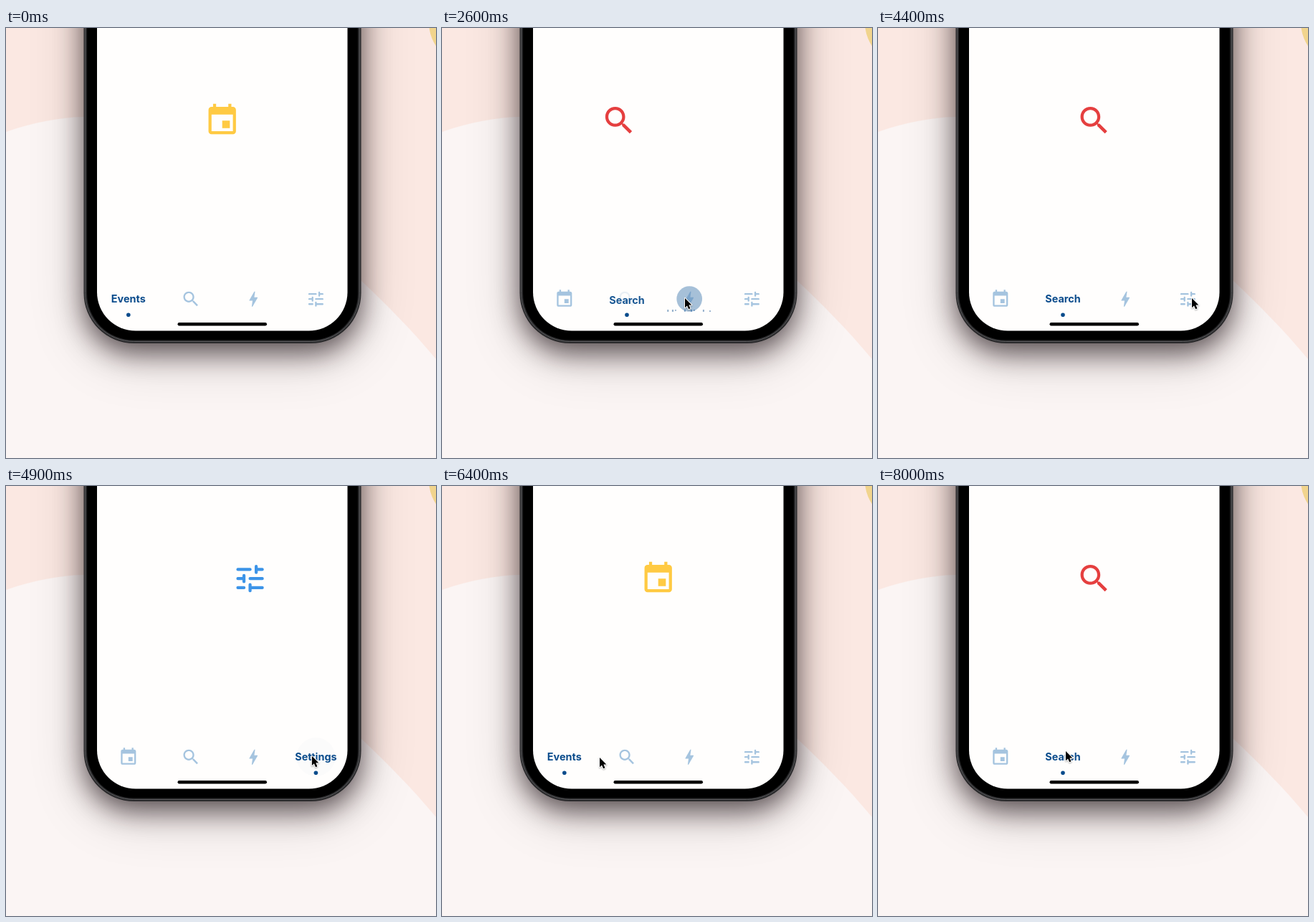
Animation, 600 px wide and 600 px high, one loop 8.1 s. Source, as an HTML page with a canvas:

```html
<!DOCTYPE html>
<html lang="en">
<head>
<meta charset="utf-8">
<title>Tab bar</title>
<style>
html, body { margin: 0; width: 100%; height: 100%; overflow: hidden; background: #fbe8e2; }
canvas { display: block; width: 600px; height: 600px; }
</style>
</head>
<body>
<canvas id="stage"></canvas>
<script>
const LOOP = 8100, STEP = 100;
const SCREEN = { x: 127, w: 349.5, bottom: 422.5 };
const NAVY = '#0b4c8c', IDLE = '#a5c4df';

const canvas = document.getElementById('stage');
const ctx = canvas.getContext('2d');
const dpr = Math.max(1, window.devicePixelRatio || 1);
canvas.width = canvas.height = 600 * dpr;

const EVENT = new Path2D('M17 12h-5v5h5v-5zM16 1v2H8V1H6v2H5c-1.11 0-1.99.9-1.99 2L3 19c0 1.1.89 2 2 2h14c1.1 0 2-.9 2-2V5c0-1.1-.9-2-2-2h-1V1h-2zm3 18H5V8h14v11z');
const SEARCH = new Path2D('M15.5 14h-.79l-.28-.27C15.41 12.59 16 11.11 16 9.5 16 5.91 13.09 3 9.5 3S3 5.91 3 9.5 5.91 16 9.5 16c1.61 0 3.09-.59 4.23-1.57l.27.28v.79l5 4.99L20.49 19l-4.99-5zm-6 0C7.01 14 5 11.99 5 9.5S7.01 5 9.5 5 14 7.01 14 9.5 11.99 14 9.5 14z');
const BOLT = new Path2D('M11 21h-1l1-7H7.5c-.88 0-.33-.75-.31-.78C8.48 10.94 10.42 7.54 13.01 3h1l-1 7h3.51c.4 0 .62.19.4.66C12.97 17.55 11 21 11 21z');
const TUNE = new Path2D('M4 6h8M16 6h4M16 4v4M4 12h4M8 10v4M12 12h8M4 18h4M12 18h8M12 16v4');
const ARROW = new Path2D('M0 0V13.2L3 10.4 5.2 15.3 7.5 14.3 5.4 9.5H9.4Z');
const BLOB = new Path2D('M0 145C40 131 75 125 108 124C280 118 400 255 495 352C530 385 567 422 600 462V600H0Z');

const tabs = [
  { label: 'Events', icon: EVENT, color: '#ffca43' },
  { label: 'Search', icon: SEARCH, color: '#e53f3f' },
  { label: 'Highlight', icon: BOLT, color: '#66bb6a' },
  { label: 'Settings', icon: TUNE, color: '#3c94e8', line: true }
];
tabs.forEach((tab, i) => { tab.x = 170.8 + 87.2 * i; });

// Each tap: start time and the tab it opens.
const taps = [[1257, 1], [2535, 2], [3600, 1], [4560, 3], [5790, 0], [7040, 1]];

// Pointer stops: time, x, y.
const stops = [
  [400, 300, 408], [900, 262, 392], [1200, 255, 387], [1700, 255, 387],
  [2300, 339, 377], [2700, 339, 377], [3300, 256, 376], [3800, 256, 376],
  [4300, 438, 377], [4800, 438, 377], [5600, 179, 373], [5900, 179, 373],
  [6400, 220, 379], [6900, 262, 372], [7300, 262, 370]
];

const clamp = v => Math.min(1, Math.max(0, v));
const mix = (a, b, u) => a + (b - a) * u;
const smooth = u => u * u * (3 - 2 * u);

// cubic-bezier(.25, .1, .25, 1)
function ease(x) {
  if (x <= 0 || x >= 1) return clamp(x);
  const at = (a, b, s) => 3 * a * s * (1 - s) ** 2 + 3 * b * s * s * (1 - s) + s ** 3;
  let lo = 0, hi = 1;
  for (let i = 0; i < 24; i++) {
    const mid = (lo + hi) / 2;
    if (at(.25, .25, mid) < x) lo = mid; else hi = mid;
  }
  return at(.1, 1, lo);
}

function disc(x, y, r, fill) {
  ctx.fillStyle = fill;
  ctx.beginPath();
  ctx.arc(x, y, r, 0, Math.PI * 2);
  ctx.fill();
}

function box(x, y, w, h, r) {
  ctx.beginPath();
  ctx.roundRect(x, y, w, h, r);
}

function drawIcon(tab, x, y, scale, color) {
  ctx.save();
  ctx.translate(x, y);
  ctx.scale(scale, scale);
  ctx.translate(-12, -12);
  if (tab.line) {
    ctx.strokeStyle = color;
    ctx.lineWidth = 2;
    ctx.lineCap = 'round';
    ctx.stroke(tab.icon);
  } else {
    ctx.fillStyle = color;
    ctx.fill(tab.icon, 'evenodd');
  }
  ctx.restore();
}

function drawShadow(blur, dy, alpha) {
  ctx.save();
  ctx.shadowColor = `rgba(20,8,12,${alpha})`;
  ctx.shadowBlur = blur * dpr;
  ctx.shadowOffsetY = dy * dpr;
  ctx.fillStyle = '#000';
  box(110, -200, 384, 638, 68);
  ctx.fill();
  ctx.restore();
}

function drawBackdrop() {
  ctx.fillStyle = '#fbe8e2';
  ctx.fillRect(0, 0, 600, 600);
  ctx.fillStyle = '#fbf5f4';
  ctx.fill(BLOB);
  disc(650, -8, 60, '#f1d48d');
}

function drawPhone() {
  drawShadow(80, 18, .2);
  drawShadow(38, 14, .68);
  ctx.fillStyle = '#29292b';
  box(108.5, -200, 387, 640, 70);
  ctx.fill();
  ctx.strokeStyle = '#59595b';
  ctx.lineWidth = 1;
  box(110.5, -200, 383, 637.5, 68);
  ctx.stroke();
  ctx.fillStyle = '#000';
  box(113, -200, 378, 635.5, 65);
  ctx.fill();
  ctx.fillStyle = '#fffefd';
  box(SCREEN.x, -200, SCREEN.w, 200 + SCREEN.bottom, 54);
  ctx.fill();
}

function drawPages(from, to, age) {
  const pos = mix(from, to, ease(clamp(age / 480)));
  ctx.save();
  box(SCREEN.x, 0, SCREEN.w, 340, 0);
  ctx.clip();
  tabs.forEach((tab, i) => {
    const x = 301.7 + (i - pos) * SCREEN.w;
    if (Math.abs(x - 301.7) < 210) drawIcon(tab, x, 129.2, 2.13, tab.color);
  });
  ctx.restore();
}

function drawLabel(tab, hidden) {
  ctx.save();
  box(SCREEN.x, 350, SCREEN.w, 46, 0);
  ctx.clip();
  ctx.globalAlpha = 1 - hidden * hidden;
  ctx.fillStyle = NAVY;
  ctx.font = '700 14.4px Inter, Roboto, sans-serif';
  ctx.textAlign = 'center';
  ctx.fillText(tab.label, tab.x, 383.2 + 36 * hidden * hidden);
  ctx.restore();
}

function drawBar(from, to, age) {
  const u = clamp(age / 270);
  tabs.forEach((tab, i) => {
    const shown = i === to ? u : i === from ? 1 - u : 0;
    ctx.globalAlpha = 1 - shown;
    drawIcon(tab, tab.x, 378.2, 1.17, IDLE);
    ctx.globalAlpha = 1;
    if (shown > 0) drawLabel(tab, 1 - shown);
  });

  const slide = smooth(clamp((age - 65) / 240));
  disc(mix(tabs[from].x, tabs[to].x, slide), 400.2, 2.8, NAVY);

  const fade = 1 - clamp((age - 100) / 250);
  if (fade > 0) {
    const r = Math.min(27, 12 + .09 * age);
    disc(tabs[to].x, 378, r, `rgba(10,80,150,${.36 * fade})`);
  }

  ctx.fillStyle = '#000';
  box(239.5, 411, 124.5, 4.4, 2.2);
  ctx.fill();
}

function drawPointer(t) {
  if (t < stops[0][0]) return;
  let k = 0;
  while (k < stops.length - 2 && t >= stops[k + 1][0]) k++;
  const [t0, x0, y0] = stops[k], [t1, x1, y1] = stops[k + 1];
  const u = smooth(clamp((t - t0) / (t1 - t0)));
  const x = mix(x0, x1, u), y = mix(y0, y1, u);

  if (taps.some(([at]) => t > at - 130 && t < at + 10)) {
    ctx.strokeStyle = '#000';
    ctx.lineWidth = 1.5;
    ctx.beginPath();
    ctx.arc(x, y + 1, 19.8, 0, Math.PI * 2);
    ctx.stroke();
  }

  ctx.save();
  ctx.translate(x, y);
  ctx.shadowColor = 'rgba(0,0,0,.3)';
  ctx.shadowBlur = 2 * dpr;
  ctx.shadowOffsetY = dpr;
  ctx.strokeStyle = '#fff';
  ctx.lineWidth = 2;
  ctx.lineJoin = 'round';
  ctx.stroke(ARROW);
  ctx.shadowColor = 'transparent';
  ctx.fillStyle = '#000';
  ctx.fill(ARROW);
  ctx.restore();
}

function draw(t) {
  let from = 0, to = 0, age = 1e4;
  for (const [at, tab] of taps) {
    if (t < at) break;
    from = to;
    to = tab;
    age = t - at;
  }
  ctx.setTransform(dpr, 0, 0, dpr, 0, 0);
  drawBackdrop();
  drawPhone();
  drawPages(from, to, age);
  drawBar(from, to, age);
  drawPointer(t);
}

const start = performance.now();
function tick() {
  const t = (performance.now() - start) % LOOP;
  draw(Math.floor(t / STEP) * STEP);
  requestAnimationFrame(tick);
}
tick();
</script>
</body>
</html>
```
